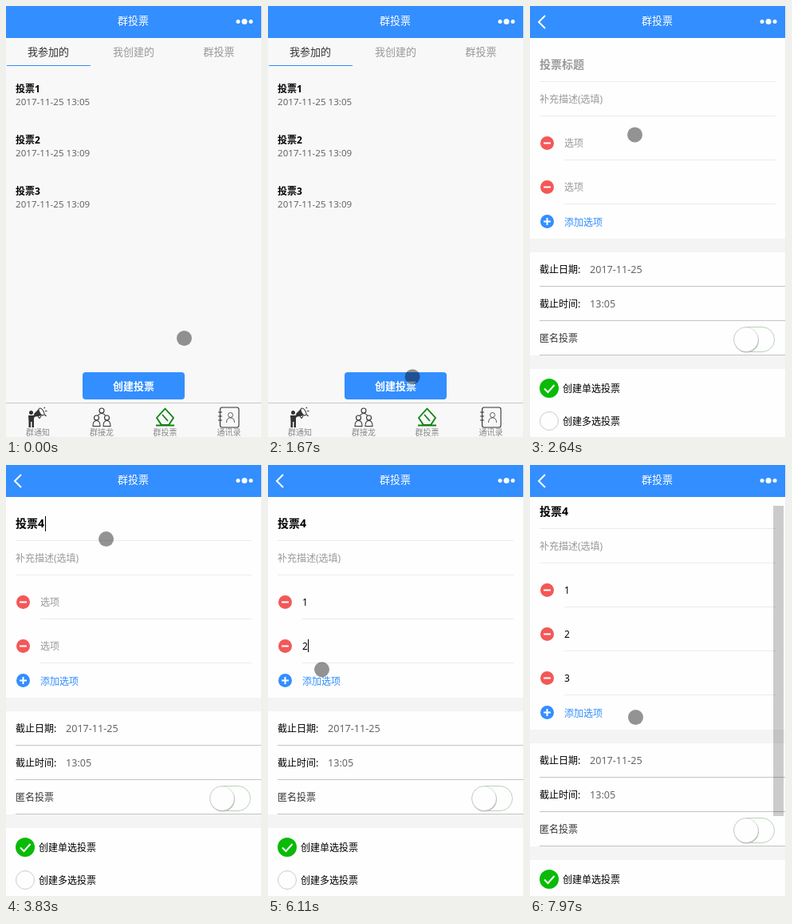
These frames come from a looping animation (321 by 539 pixels, 8000 ms). An HTML page:

```html
<!DOCTYPE html>
<html lang="zh-CN">
<head>
<meta charset="utf-8">
<title>群投票</title>
<style>
html, body { margin: 0; width: 100%; height: 100%; overflow: hidden; background: #fefefe; }
svg { display: block; font: 12px "Noto Sans", "Noto Sans CJK SC", sans-serif; }
.mid { text-anchor: middle; }
.f13 { font-size: 13px; }
.f14 { font-size: 14px; }
.b { font-weight: bold; }
.date { font-size: 11.6px; fill: #666; }
.val { font-size: 12.6px; fill: #666; }
.hint { fill: #999; }
.label { font-size: 10px; fill: #888; }
.blue { fill: #338eff; }
.band { fill: #f4f4f4; }
.thin { stroke: #ebebeb; }
.line { stroke: #c4c4c4; }
.icon { fill: none; stroke: #333; stroke-width: 1.1; }
.white { fill: none; stroke: #fff; stroke-width: 2; }
</style>
</head>
<body>
<svg width="321" height="539" viewBox="0 0 321 539">
  <defs>
    <g id="tabs">
      <g class="mid f13"><text x="53" y="61.5" fill="#333">我参加的</text><text x="160" y="61.5" class="hint">我创建的</text></g>
      <path d="M1 74.5H106" stroke="#338eff"/>
    </g>
    <rect id="button" x="96" y="458" width="128" height="34" rx="4" class="blue"/>
    <g id="row">
      <circle cx="21.5" cy="171.5" r="8.5" fill="#f45757"/>
      <path d="M17 171.5H26" class="white"/>
      <path d="M43 192.5H308" class="thin"/>
    </g>
  </defs>

  <g id="list">
    <rect y="40" width="320" height="499" fill="#f8f8f8"/>
    <use href="#tabs"/><text x="267" y="61.5" class="mid f13 hint">群投票</text>
    <text x="12" y="107.5" class="b">投票1</text><text x="12" y="124" class="date">2017-11-25 13:05</text>
    <text x="12" y="171.5" class="b">投票2</text><text x="12" y="188" class="date">2017-11-25 13:09</text>
    <text x="12" y="235.5" class="b">投票3</text><text x="12" y="252" class="date">2017-11-25 13:09</text>
    <use href="#button"/><text x="160" y="480" class="mid f13 b" fill="#fff">创建投票</text>
    <path d="M0 496.5H320" stroke="#c8c8c8"/>
    <g class="mid label"><text x="40" y="537">群通知</text><text x="120" y="537">群接龙</text><text x="199.5" y="537">群投票</text><text x="279.5" y="537">通讯录</text></g>
    <g fill="#333">
      <circle cx="31.5" cy="508.5" r="2.5"/>
      <path d="M28 512H34L38 509.5L39 511.5L35 515V527H32.5V520H31V527H28.5V520Z"/>
      <path d="M35 510L42 503L47 512L37 513.5Z"/>
      <ellipse cx="44.500" cy="507.500" rx="2.500" ry="5" transform="rotate(-30 44.500 507.500)" fill="#f8f8f8" stroke="#333"/>
      <path d="M40 513L42 515.500L44 513M47.500 503L49 502M49 506.500H51.500M48.500 511L50.500 513" class="icon"/>
    </g>
    <g class="icon">
      <circle cx="120" cy="506" r="3"/><circle cx="113.5" cy="515" r="3"/><circle cx="126.5" cy="515" r="3"/>
      <path d="M115.5 512Q117 509.5 120 509.5T124.5 512M109 525.5Q109 518.5 113.5 518.5T118 525.5ZM122 525.5Q122 518.5 126.5 518.5T131 525.5Z"/>
      <rect x="268.5" y="502" width="23.5" height="25" rx="2.5"/>
      <path d="M266 508H271M266 513H271M266 518H271"/>
      <g stroke-width=".8"><circle cx="281.5" cy="511.5" r="3"/><path d="M276.500 521Q276.500 515 281.500 515T286.500 521"/></g>
    </g>
    <path d="M199.5 503.5L210 515L204 524H195L189 515ZM196 511L203 519M188 524.5H211" fill="none" stroke="#118011" stroke-width="1.8"/>
  </g>

  <g id="prev">
    <path d="M0 75H12V83H0ZM0 139H12V147H0ZM0 203H12V496H0Z" class="band"/>
    <rect x="12" y="51" width="308" height="480" fill="#f8f8f8"/>
    <use href="#tabs"/><text x="267" y="61.5" class="mid f13 hint">群活动</text>
    <text x="12" y="107.5" class="b">今晚五人制足球比赛报名</text><text x="12" y="124" class="date">2017-11-25 17:59</text>
    <text x="12" y="171.5" class="b">晚上吃夜宵</text><text x="12" y="188" class="date">2017-11-25 13:05</text>
    <use href="#button"/><text x="160" y="480" class="mid f13 b" fill="#fff">创建接龙</text>
  </g>

  <g id="form">
    <rect id="sheet" y="51" width="320" height="480" fill="#f9f9f9"/>
    <text id="title" x="12" y="78" class="f14 b"></text>
    <path d="M12 94.5H308M12 137.5H308" class="thin"/>
    <text x="12" y="121" class="hint">补充描述(选填)</text>
    <use href="#row"/><use href="#row" y="55"/>
    <text id="opt1" x="43" y="176"></text>
    <text id="opt2" x="43" y="231"></text>
    <g id="third"><use href="#row" y="110"/><text id="opt3" x="43" y="286"></text></g>
    <rect id="caret" width="1"/>
    <g id="rest">
      <circle cx="21.5" cy="269.5" r="8.5" class="blue"/>
      <path d="M17 269.5H26M21.5 265V274" class="white"/>
      <text x="43" y="275" class="blue">添加选项</text>
      <path id="bands" d="M0 291H320V308H0ZM0 437H320V454H0Z" class="band"/>
      <text x="12" y="334">截止日期:</text><text x="75" y="334" class="val">2017-11-25</text>
      <text x="12" y="377">截止时间:</text><text x="75" y="377" class="val">13:05</text>
      <text x="12" y="420" fill="#333">匿名投票</text>
      <path d="M12 350.5H320M12 393.5H320M12 436.5H320" class="line"/>
      <rect x="255.5" y="401.5" width="51" height="31" rx="15.5" fill="#fefefe" stroke="#b9d3b9"/>
      <circle cx="271.5" cy="418" r="15.5" fill="#bbb"/>
      <circle cx="271" cy="417" r="15.2" fill="#fefefe" stroke="#ccc" stroke-width=".6"/>
      <circle cx="24" cy="478" r="12" fill="#09bb07"/>
      <path d="M18 478.5L22.5 483L30.5 474" class="white"/>
      <text x="41" y="483">创建单选投票</text>
      <circle cx="24" cy="519" r="11.5" fill="none" stroke="#ccc"/>
      <text x="41" y="524">创建多选投票</text>
    </g>
  </g>

  <rect id="bar" x="305" y="51" width="13" height="388" fill="#000" fill-opacity=".2"/>
  <rect width="320" height="40" class="blue"/>
  <path id="back" d="M19 12L11 20L19 28" class="white"/>
  <text x="159.5" y="22.5" class="mid f13" fill="#fff">群投票</text>
  <g fill="#fff"><circle cx="291" cy="19.5" r="2.5"/><circle cx="299" cy="19.5" r="3.5"/><circle cx="307" cy="19.5" r="2.5"/></g>
  <rect x="320" width="1" height="539" fill="#eee"/>
  <circle id="touch" cx=".5" cy=".5" r="9.5" fill="#000" fill-opacity=".42"/>
</svg>
<script>
const LOOP = 8000, TICK = 119.2;
const $ = id => document.getElementById(id);
const show = (id, on) => $(id).setAttribute('visibility', on ? 'inherit' : 'hidden');
const move = (id, x, y) => $(id).setAttribute('transform', `translate(${x} ${y})`);

// time, x, y
const touchPath = [
  [250, 223, 415], [609, 198, 407], [1085, 215, 444], [1681, 172, 468], [1919, 172, 468],
  [2277, 209, 303], [2754, 105, 113], [3112, 98, 88], [3707, 98, 88], [3826, 125, 92],
  [4065, 143, 125], [4303, 114, 194], [4422, 112, 182], [4780, 112, 182], [5257, 106, 229],
  [5615, 100, 230], [5734, 100, 230], [6330, 45, 272], [6568, 45, 272], [6807, 78, 290],
  [7404, 74, 286], [7880, 132, 315]
];
const slidePath = [[2158, 320], [2277, 267], [2396, 60], [2515, 0]];

const fields = [
  { id: 'title', hint: '投票标题', value: '投票4', focus: 3120, typed: 3830, blur: 4310, x: 12, end: 49, y: 64, h: 19 },
  { id: 'opt1', hint: '选项', value: '1', focus: 4430, typed: 4910, blur: 5390, x: 43, end: 50, y: 163, h: 16 },
  { id: 'opt2', hint: '选项', value: '2', focus: 5390, typed: 5750, blur: 6350, x: 43, end: 50, y: 218, h: 16 },
  { id: 'opt3', hint: '选项', value: '3', focus: 6930, typed: 7280, blur: 7500, x: 43, end: 50, y: 273, h: 16 }
];

// Linear interpolation along a list of [time, ...values]
function along(path, t) {
  const i = path.findIndex(p => p[0] > t);
  if (i < 1) return (i ? path[path.length - 1] : path[0]).slice(1);
  const a = path[i - 1], b = path[i], k = (t - a[0]) / (b[0] - a[0]);
  return a.slice(1).map((v, j) => v + (b[j + 1] - v) * k);
}

function drawFields(t) {
  let caret = false;
  for (const f of fields) {
    const el = $(f.id), done = t >= f.typed;
    el.textContent = done ? f.value : f.hint;
    el.setAttribute('fill', done ? '#000' : '#999');
    if (t < f.focus || t >= f.blur) continue;
    caret = done || t < f.typed - 245;
    $('caret').setAttribute('x', done ? f.end : f.x);
    $('caret').setAttribute('y', f.y);
    $('caret').setAttribute('height', f.h);
  }
  show('caret', caret);
}

function draw(t) {
  const step = 370 + Math.floor((t - 370) / TICK) * TICK;
  const opened = step > 2150, added = t >= 6600, scrolled = t >= 7965;
  const [slide] = along(slidePath, step), sliding = opened && slide > 0;
  show('list', !opened);
  show('prev', sliding);
  show('form', opened);
  show('back', opened);
  show('sheet', sliding);
  show('bands', opened && !sliding);
  show('third', opened && added);
  show('bar', scrolled);
  move('form', slide, scrolled ? -15 : 0);
  move('rest', 0, added ? 55 : 0);
  move('touch', ...along(touchPath, step));
  drawFields(t);
}

const start = performance.now();
function frame() {
  draw((performance.now() - start) % LOOP);
  requestAnimationFrame(frame);
}
frame();
</script>
</body>
</html>
```
